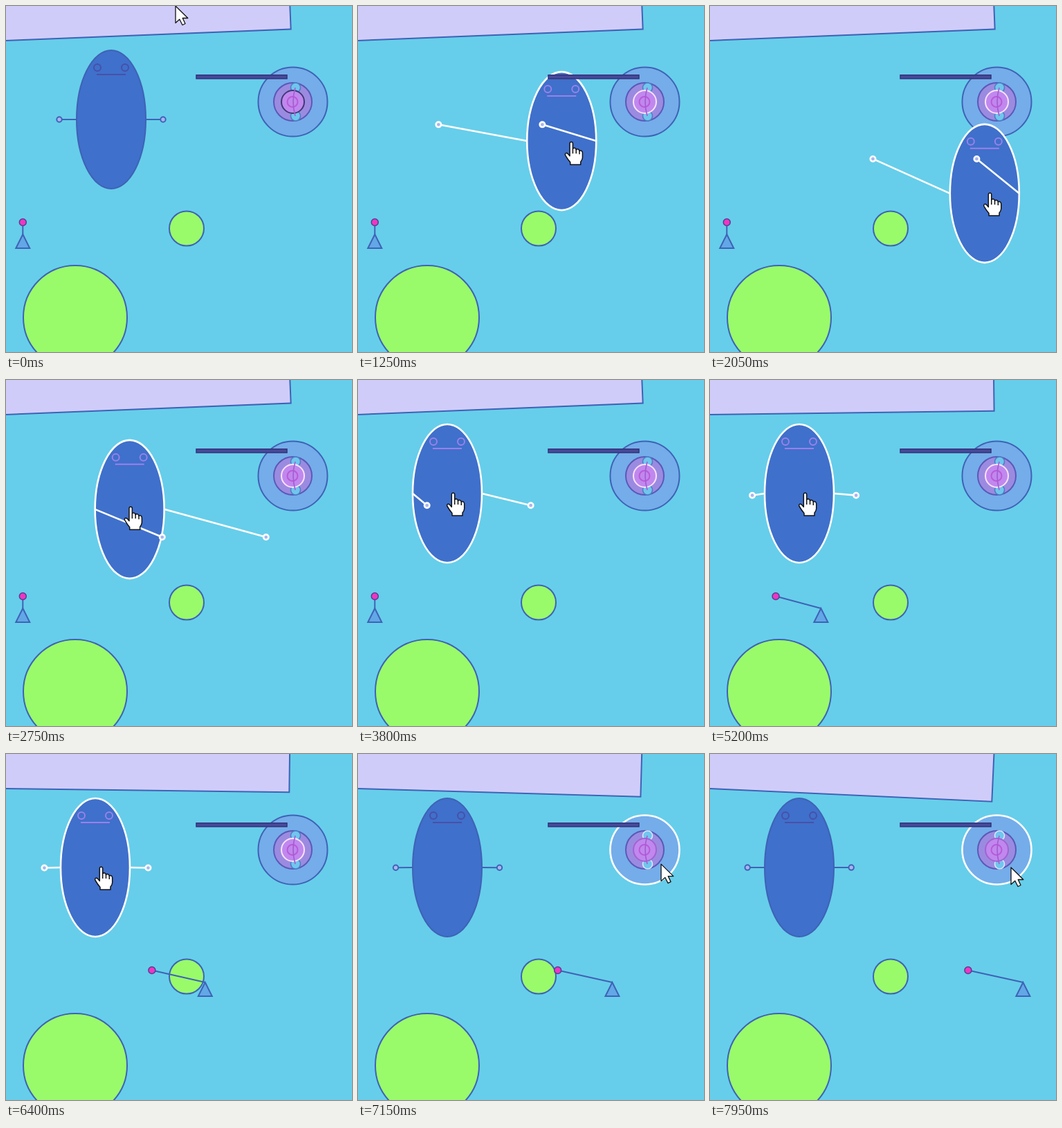
Animation of 500 by 500 pixels, one loop 8000 ms. Source, as an HTML page:

```html
<!DOCTYPE html>
<html lang="en">
<head>
<meta charset="utf-8">
<title>Drag the figure</title>
<style>
html, body { margin: 0; width: 100%; height: 100%; overflow: hidden; background: #66ceea; }
svg { display: block; width: 100%; height: 100%; }
.ink { stroke: #3f62b6; stroke-width: 2; }
.lit { stroke: #fff; stroke-width: 2.6; }
</style>
</head>
<body>
<svg viewBox="0 0 500 500" fill="none">
  <rect width="500" height="500" fill="#66ceea"/>
  <rect id="panel" class="ink" x="-150" y="-200" width="560" height="250" fill="#d0ccfa"/>
  <circle class="ink" cx="100" cy="450" r="75" fill="#99fb6a"/>
  <circle class="ink" cx="261" cy="321.5" r="25" fill="#99fb6a"/>

  <circle id="disc" class="ink" cx="414.5" cy="138.5" r="50" fill="#74adea"/>
  <circle cx="414.5" cy="138.5" r="27.5" fill="#9b8be0" stroke="#5a59b8" stroke-width="2"/>
  <g id="knobs" fill="#70c6ee" stroke-width="1.6">
    <circle cx="418.5" cy="118" r="7"/>
    <circle cx="418.5" cy="159" r="7"/>
  </g>
  <circle id="ring" cx="414.5" cy="138.5" r="16.5" fill="#c088ee" stroke-width="2"/>
  <circle cx="414" cy="138.5" r="7.5" stroke="#b95ad8" stroke-width="2"/>
  <path d="M418 118Q412 138 418 159" stroke="#a45cd0" stroke-width="1.6"/>

  <g id="body">
    <ellipse id="torso" rx="50" ry="100" fill="#3f70cb"/>
    <g id="face" stroke-width="2">
      <circle cx="-20" cy="-75" r="5"/>
      <circle cx="20" cy="-75" r="5"/>
      <path d="M-21 -65H21"/>
    </g>
  </g>
  <rect x="275" y="99.8" width="131" height="5.2" fill="#4a4899" stroke="#30347c" stroke-width="1.5"/>
  <g id="arms">
    <path id="sleeves"/>
    <circle id="left" r="3.7" fill="#a9b5ee"/>
    <circle id="right" r="3.7" fill="#a9b5ee"/>
  </g>

  <g class="ink">
    <path id="rod"/>
    <path id="cone" d="M0 330L10 350H-10Z" fill="#62a7e6"/>
    <circle id="ball" cy="312.5" r="5" fill="#f035c4" stroke="#53408f" stroke-width="1.5"/>
  </g>

  <g id="pointer" fill="#fff" stroke="#111" stroke-linejoin="round">
    <path id="arrow" stroke-width="1.3" d="M0 0V24.5L5.8 19.3L10 27.5L14 25.5L10.2 17.5H17.8Z"/>
    <g id="hand" stroke-width="1.5" transform="translate(-.5 -1)">
      <path d="M-2.2 1Q-2 -.8 0 -.8Q2.2 -.8 2.2 1.5V9Q3 7.5 5 8Q6.8 8.4 7 10.5Q8 9 10 9.7Q11.6 10.3 11.8 12.2Q13 11 14.8 12Q16.2 13 16.2 15V22Q16 25 13.5 28V32H-1.5V28.5Q-5 24.5 -8.5 18.5Q-9.5 16 -7.5 15.3Q-5.5 15 -4 17.3L-2.2 19.5Z"/>
      <path d="M2.2 9V16M7 10V16M11.8 12V17"/>
    </g>
  </g>
</svg>
<script>
const LOOP = 8, FOLLOW = 1.33, LAG = 0.022;
const GRAB = 0.7, LAUNCH = 3.92;

// Pointer route: seconds, x, y
const route = [
  [0, 245, 0], [.05, 245, 0], [.28, 205, 78], [.48, 167, 157], [.6, 161, 165], [GRAB, 161, 165],
  [.95, 226, 175.5], [1.228, 303, 196], [1.48, 359, 226], [1.73, 394, 256],
  [1.98, 407, 271], [2.23, 384, 266], [2.48, 294, 226], [2.728, 188, 188],
  [2.88, 156, 174], [3.08, 145, 168.5], [3.35, 138, 165], [3.4, 138, 165],
  [6.4, 138, 165], [6.45, 138, 165], [6.62, 290, 160], [6.78, 398, 152],
  [7.2, 440, 160], [7.6, 435, 164], [7.7, 435, 164], [LOOP, 435, 164]
];

const $ = id => document.getElementById(id);
const set = (id, attrs) => {
  for (const k in attrs) $(id).setAttribute(k, attrs[k]);
};
const move = (id, x, y) => set(id, { transform: `translate(${x} ${y})` });

function slope(i, c) {
  const a = route[Math.max(i - 1, 0)], b = route[Math.min(i + 1, route.length - 1)];
  return (b[c] - a[c]) / (b[0] - a[0]);
}

function pointerAt(t) {
  let i = 0;
  while (i < route.length - 2 && t >= route[i + 1][0]) i++;
  const a = route[i], b = route[i + 1], d = b[0] - a[0], u = (t - a[0]) / d;
  return [1, 2].map(c => {
    if (a[c] === b[c]) return a[c];
    const p = u * u * (3 - 2 * u);
    return a[c] + (b[c] - a[c]) * p
      + d * u * (1 - u) * (slope(i, c) * (1 - u) - slope(i + 1, c) * u);
  });
}

function bodyAt(t) {
  const [x, y] = pointerAt(Math.min(Math.max(t - LAG, GRAB), 3.4));
  return [x - 9, y - 1];
}

// Hands drift after the body; solved once, then looked up by time.
const STEP = 0.01, trail = [bodyAt(0)];
for (let i = 1; i <= LOOP / STEP + 1; i++) {
  const goal = bodyAt((i - .5) * STEP), ease = 1 - Math.exp(-FOLLOW * STEP);
  trail.push(trail[i - 1].map((v, c) => v + (goal[c] - v) * ease));
}
function handsAt(t) {
  const i = Math.floor(t / STEP), u = t / STEP - i;
  return trail[i].map((v, c) => v + (trail[i + 1][c] - v) * u);
}

const within = (p, c, rx, ry) => Math.hypot((p[0] - c[0]) / rx, (p[1] - c[1]) / ry) < 1;

function draw(t) {
  const p = pointerAt(t), b = bodyAt(t), h = handsAt(t);
  const held = within(p, b, 50, 100), overDisc = within(p, [414.5, 138.5], 50, 50);
  const tone = on => on ? 'lit' : 'ink';

  move('body', ...b);
  set('torso', { class: tone(held) });
  set('face', { stroke: held ? '#9a80ea' : '#4850a8' });
  set('arms', { class: tone(held) });
  set('sleeves', {
    d: `M${b[0] - 50} ${b[1]}L${h[0] - 75} ${h[1]}M${b[0] + 50} ${b[1]}L${h[0] + 75} ${h[1]}`
  });
  set('left', { cx: h[0] - 75, cy: h[1] });
  set('right', { cx: h[0] + 75, cy: h[1] });

  set('disc', { class: tone(overDisc) });
  set('knobs', { stroke: overDisc ? '#d9e9ff' : '#4b7fc4' });
  set('ring', { stroke: held ? '#f9e2ff' : overDisc ? '#a263d2' : '#403a78' });

  const run = Math.max(0, t - LAUNCH), speed = 106.2;
  const cone = 24.3 + speed * run;
  const ball = cone - speed / FOLLOW * (1 - Math.exp(-FOLLOW * run));
  move('cone', cone, 0);
  set('ball', { cx: ball });
  set('rod', { d: `M${ball} 312.5L${cone} 330` });
  set('panel', { transform: `rotate(${-2.29 + 1.22 * run})` });

  move('pointer', ...p);
  set('arrow', { visibility: held ? 'hidden' : 'visible' });
  set('hand', { visibility: held ? 'visible' : 'hidden' });
}

const start = performance.now();
function tick() {
  draw((performance.now() - start) / 1000 % LOOP);
  requestAnimationFrame(tick);
}
tick();
</script>
</body>
</html>
```
